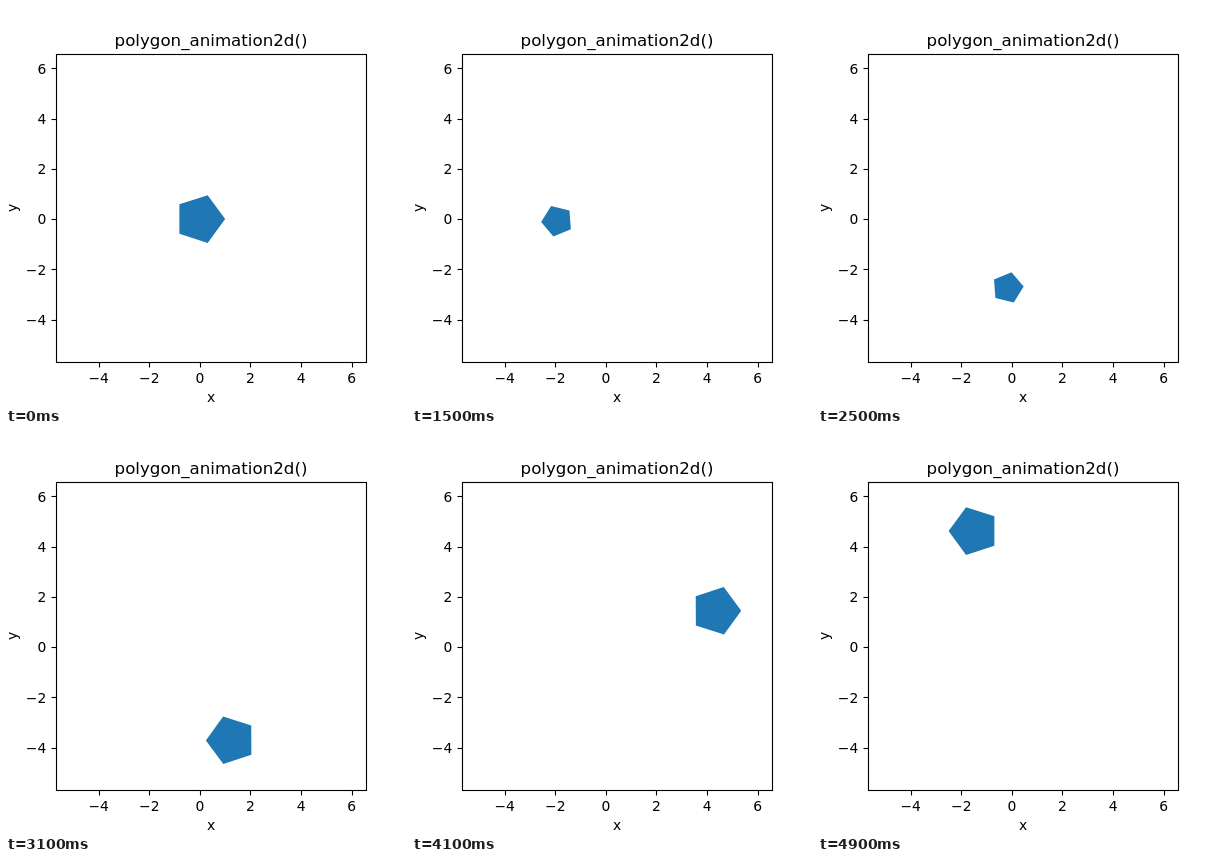
Write an HTML page with a canvas that moves like this. It is 400 by 400 pixels and loops after 5 s.

```html
<!DOCTYPE html>
<html lang="en">
<head>
<meta charset="utf-8">
<title>polygon_animation2d()</title>
<style>
  html, body { margin: 0; width: 100%; height: 100%; overflow: hidden; background: #fff; }
  canvas { display: block; width: 400px; height: 400px; }
</style>
</head>
<body>
<canvas id="stage" width="400" height="400"></canvas>
<script>
const ctx = document.getElementById('stage').getContext('2d');
const FONT = '"DejaVu Sans", sans-serif';
const BOX = { left: 50, right: 360, top: 48, bottom: 356 };
const TICKS = [-4, -2, 0, 2, 4, 6];
const SIDES = 5, MOVES = 5, STEPS = 10, STEP_MS = 100;
const TURN = 108, SHIFT = 1.5;

const polar = (r, deg) => [r * Math.cos(deg * Math.PI / 180), r * Math.sin(deg * Math.PI / 180)];
const add = (a, b) => [a[0] + b[0], a[1] + b[1]];
const mix = (a, b, k) => a.map((v, i) => v + (b[i] - v) * k);
const easeInOut = u => u < 0.5 ? 4 * u ** 3 : 1 - 4 * (1 - u) ** 3;

function rotate([x, y], deg) {
  const [c, s] = polar(1, deg);
  return [x * c - y * s, x * s + y * c];
}

// Each pose turns the previous one about the origin, then shifts it.
const poses = [Array.from({ length: SIDES }, (_, i) => polar(1, i * 360 / SIDES))];
for (let n = 0; n < MOVES; n++) {
  const shift = polar(SHIFT, TURN + 72 * n);
  poses.push(poses[n].map(p => add(rotate(p, TURN), shift)));
}

// Both axes share limits: one unit beyond the extreme coordinates.
const coords = poses.flat(2);
const lo = Math.min(...coords) - 1;
const hi = Math.max(...coords) + 1;
const px = x => BOX.left + (x - lo) / (hi - lo) * (BOX.right - BOX.left);
const py = y => BOX.bottom - (y - lo) / (hi - lo) * (BOX.bottom - BOX.top);

function text(str, x, y, size, align) {
  ctx.font = `${size}px ${FONT}`;
  ctx.textAlign = align;
  ctx.fillText(str, x, y);
}

function line(x1, y1, x2, y2) {
  ctx.beginPath();
  ctx.moveTo(x1, y1);
  ctx.lineTo(x2, y2);
  ctx.stroke();
}

function drawAxes() {
  const { left, right, top, bottom } = BOX;
  const small = 13.89;
  ctx.fillStyle = ctx.strokeStyle = '#000';
  ctx.lineWidth = 1.11;
  ctx.strokeRect(left + 0.5, top + 0.5, right - left, bottom - top);
  for (const v of TICKS) {
    const label = String(v).replace('-', '\u2212');
    const x = Math.round(px(v)) + 0.5, y = Math.round(py(v)) + 0.5;
    line(x, bottom + 0.5, x, bottom + 5.5);
    line(left + 0.5, y, left - 4.5, y);
    text(label, px(v), 377, small, 'center');
    text(label, 40.3, Math.round(py(v) + 5.3), small, 'right');
  }
  text('polygon_animation2d()', 205, 40, 16.67, 'center');
  text('x', 205, 396, small, 'center');
  ctx.save();
  ctx.translate(11, 202);
  ctx.rotate(-Math.PI / 2);
  text('y', 0, 0, small, 'center');
  ctx.restore();
}

function drawPolygon(step) {
  const n = Math.floor(step / STEPS);
  const k = easeInOut(step % STEPS / (STEPS - 1));
  ctx.fillStyle = '#1f77b4';
  ctx.beginPath();
  poses[n].forEach((p, i) => {
    const [x, y] = mix(p, poses[n + 1][i], k);
    ctx.lineTo(px(x), py(y));
  });
  ctx.closePath();
  ctx.fill();
}

const start = performance.now();

function render() {
  const elapsed = Math.max(0, performance.now() - start);
  ctx.fillStyle = '#fff';
  ctx.fillRect(0, 0, 400, 400);
  drawPolygon(Math.floor(elapsed / STEP_MS) % (MOVES * STEPS));
  drawAxes();
  requestAnimationFrame(render);
}
render();
</script>
</body>
</html>
```
